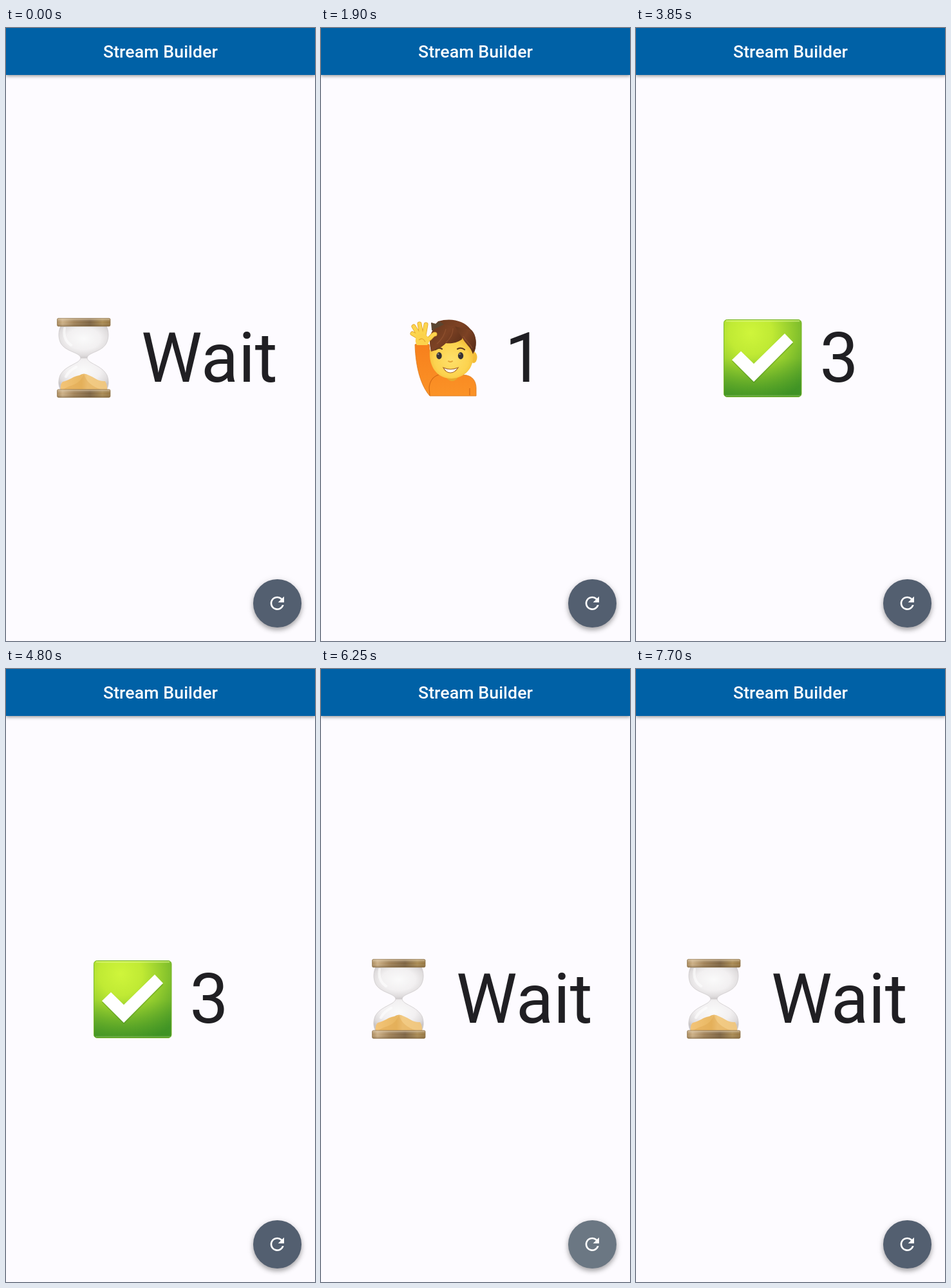
These frames come from a looping animation (480 by 953 pixels, 8000 ms). An HTML page:

```html
<!DOCTYPE html>
<html lang="en">
<head>
<meta charset="utf-8">
<title>Stream Builder</title>
<style>
  html, body { margin: 0; width: 100%; height: 100%; overflow: hidden; background: #fdfbff; }
  body { position: relative; font-family: Roboto, sans-serif; }
  header { position: absolute; left: 0; top: 0; width: 480px; height: 73px; background: #0061a6;
    box-shadow: 0 2px 5px rgba(0, 0, 0, .38); }
  .fab { position: absolute; left: 384px; top: 857px; width: 74.7px; height: 74.7px; border-radius: 50%;
    background: #535f70; box-shadow: 0 4px 7px rgba(0, 0, 0, .28), 0 2px 12px rgba(0, 0, 0, .12);
    animation: press 8s step-end infinite; }
  svg { position: absolute; left: 0; top: 0; width: 480px; height: 953px; }
  .title { font-size: 26.67px; font-weight: 500; letter-spacing: .1px; fill: #fff; text-anchor: middle; }
  .big { font-size: 106.67px; fill: #201f23; }
  .state { visibility: hidden; animation: 8s step-end infinite; }
  .wait { animation-name: wait; }
  .one { animation-name: one; }
  .two { animation-name: two; }
  .data { animation-name: data; }
  .done { animation-name: done; }
  @keyframes wait { 0%, 66.25% { visibility: visible } 23.75% { visibility: hidden } 100% { visibility: visible } }
  @keyframes data { 0%, 48.125%, 100% { visibility: hidden } 23.75% { visibility: visible } }
  @keyframes one { 0%, 36.25%, 100% { visibility: hidden } 23.75% { visibility: visible } }
  @keyframes two { 0%, 48.125%, 100% { visibility: hidden } 36.25% { visibility: visible } }
  @keyframes done { 0%, 66.25%, 100% { visibility: hidden } 48.125% { visibility: visible } }
  @keyframes press {
    0%, 84.375%, 100% { background: #535f70 }
    71.875% { background: #65717f }
    78.125% { background: #6b7783 }
  }
</style>
</head>
<body>
<header></header>
<div class="fab"></div>
<svg viewBox="0 0 480 953">
  <defs>
    <linearGradient id="wood">
      <stop offset="0" stop-color="#a98a5c"/><stop offset=".1" stop-color="#cdb085"/>
      <stop offset=".32" stop-color="#a08156"/><stop offset=".62" stop-color="#7c6240"/>
      <stop offset=".85" stop-color="#a98a52"/><stop offset="1" stop-color="#94743f"/>
    </linearGradient>
    <linearGradient id="gloss" x2="0" y2="1">
      <stop offset="0" stop-color="#fff" stop-opacity=".3"/><stop offset=".5" stop-color="#fff" stop-opacity="0"/>
      <stop offset="1" stop-color="#3e2a0c" stop-opacity=".3"/>
    </linearGradient>
    <radialGradient id="glass" cx=".5" cy=".4" r=".62">
      <stop offset="0" stop-color="#fafafa"/><stop offset=".55" stop-color="#f2f0f1"/>
      <stop offset=".85" stop-color="#dedbdc"/><stop offset="1" stop-color="#c9c5c6"/>
    </radialGradient>
    <linearGradient id="sand">
      <stop offset="0" stop-color="#f3c478"/><stop offset=".45" stop-color="#e9b863"/>
      <stop offset=".58" stop-color="#f2cb84"/><stop offset="1" stop-color="#efc680"/>
    </linearGradient>
    <radialGradient id="green" gradientUnits="userSpaceOnUse" cx="178" cy="474" r="112">
      <stop offset="0" stop-color="#cff53b"/><stop offset=".3" stop-color="#c0ea34"/>
      <stop offset=".62" stop-color="#8cc72d"/><stop offset="1" stop-color="#4b9b27"/>
    </radialGradient>
    <linearGradient id="shade" x2="0" y2="1">
      <stop offset=".5" stop-color="#328a22" stop-opacity="0"/><stop offset="1" stop-color="#328a22" stop-opacity=".55"/>
    </linearGradient>
    <linearGradient id="shirt" x2="0" y2="1">
      <stop offset="0" stop-color="#f77f1c"/><stop offset="1" stop-color="#fb9327"/>
    </linearGradient>
    <radialGradient id="skin" cx=".5" cy=".55" r=".6">
      <stop offset="0" stop-color="#fee06a"/><stop offset=".65" stop-color="#fcd34f"/>
      <stop offset="1" stop-color="#efb42f"/>
    </radialGradient>
    <linearGradient id="hair" x2="1" y2=".7">
      <stop offset="0" stop-color="#67381d"/><stop offset=".5" stop-color="#7d4224"/><stop offset="1" stop-color="#5c2f19"/>
    </linearGradient>
  </defs>

  <text class="title" x="240" y="46">Stream Builder</text>
  <path transform="translate(405.3 878.3) scale(1.333)" fill="#fff" d="M17.65 6.35C16.2 4.9 14.21 4 12 4c-4.42 0-7.99 3.58-7.99 8s3.57 8 7.99 8c3.73 0 6.84-2.55 7.73-6h-2.08c-.82 2.33-3.04 4-5.65 4-3.31 0-6-2.69-6-6s2.69-6 6-6c1.66 0 3.14.69 4.22 1.78L13 11h7V4l-2.35 2.35z"/>

  <g class="state wait">
    <g stroke="#cfcbcc" stroke-width=".8" fill="url(#glass)">
      <path d="M85 463C81 472 81 482 85 490C93 504 115 504 116 513H126C127 504 149 504 156 490C160 482 160 472 156 463Z"/>
      <path d="M116 513C115 522 92 524 84 540C81 548 81 556 85 563H156C160 556 160 548 157 540C149 524 127 522 126 513Z"/>
    </g>
    <path d="M91 467C89 478 92 487 101 493M93 542C97 534 103 530 109 527" fill="none" stroke="#fff" stroke-width="4" stroke-linecap="round" opacity=".6"/>
    <path fill="url(#sand)" d="M85 563C84 558 85 553 88 550C98 548 105 541 114 540Q121 535 129 540C137 543 143 550 154 549Q158 556 157 563Z"/>
    <path fill="#dca24b" opacity=".4" d="M88 563C99 553 113 558 121 538Q126 556 151 563Z"/>
    <g id="caps">
      <g id="cap">
        <rect x="79.5" y="451.3" width="82.5" height="12.4" rx="2" fill="url(#wood)"/>
        <rect x="79.5" y="451.3" width="82.5" height="12.4" rx="2" fill="url(#gloss)" stroke="#8f7249" stroke-width=".7"/>
        <path d="M81 453H161" stroke="#d8c19a" opacity=".75"/>
      </g>
      <use href="#cap" y="110.6"/>
    </g>
    <text class="big" x="210" y="550">Wait</text>
  </g>

  <g class="state data">
    <path fill="url(#hair)" d="M171 502C168 489 168 478 174 469L171 458L178 460L182 456C202 450 222 455 232 468C240 474 242 485 240 498L237 508H224L217 486L196 487L178 502Z"/>
    <path fill="#5b4631" d="M172 470L171 458L178 460L184 456L191 461L187 471Z"/>
    <path fill="url(#shirt)" stroke="#d9781e" stroke-width=".8" d="M146 492Q157 488 168 492C170 513 174 528 183 538L195 542C200 549 207 548 212 541C229 536 241 544 241 560V572H169C156 557 147 530 146 492Z"/>
    <path fill="none" stroke="#d56b15" stroke-width="1.2" d="M183 539C174 542 169 549 168 559L169 571M231 560V571"/>
    <path fill="#e8a92d" d="M194 535H213V543Q204 555 194 543Z"/>
    <ellipse cx="237" cy="512" rx="5.5" ry="9" fill="#f3bd38"/>
    <path fill="url(#skin)" d="M169 501C177 501 186 497 194 488C207 490 218 484 222 480C226 491 233 497 236 500C240 526 226 544 203 545C180 545 167 526 169 501Z"/>
    <path fill="url(#hair)" d="M171 503C168 489 169 477 176 468L191 461L207 464C217 467 221 475 219 484C211 490 201 491 194 490C188 496 180 501 171 503Z"/>
    <path fill="url(#hair)" d="M208 464L231 469C243 480 243 493 236 507C233 496 224 491 219 481Z"/>
    <path fill="none" stroke="#9b5a36" stroke-width="1.2" opacity=".6" d="M180 491C187 485 192 477 194 468M194 489C202 482 205 475 205 467M221 479C226 488 232 491 235 498"/>
    <path fill="none" stroke="#684021" stroke-width="2.2" stroke-linecap="round" d="M178 500Q183 496 188 499M212 499Q218 496 223 500"/>
    <g fill="#363235">
      <ellipse cx="183.5" cy="509.5" rx="4.2" ry="5.4"/><ellipse cx="217" cy="509.5" rx="4.2" ry="5.4"/>
    </g>
    <g fill="#8a8585"><circle cx="182" cy="507" r="1.3"/><circle cx="215.5" cy="507" r="1.3"/></g>
    <path fill="none" stroke="#e4a735" stroke-width="2" stroke-linecap="round" d="M198 518Q201 520 204 518"/>
    <path fill="#fff" stroke="#a7672a" stroke-width="1.2" d="M190 528Q201 533 213 528Q208 536 201 536Q194 536 190 528Z"/>
    <g fill="none" stroke-linecap="round">
      <path id="fingers" d="M154 482L142 475M153 479L144 464M156 477L153 460M160 478L163 461M164 485C171 484 172 476 177 476" stroke="#e2a32b" stroke-width="7"/>
      <path d="M154 482L142 475M153 479L144 464M156 477L153 460M160 478L163 461M164 485C171 484 172 476 177 476" stroke="#fcd54e" stroke-width="5.4"/>
    </g>
    <path fill="#fcd24c" d="M148 479Q157 471 165 479L169 484Q168 490 165 493H149Q145 488 148 479Z"/>
    <path fill="none" stroke="#e4a52e" stroke-width="1.1" d="M152 485Q158 480 162 488"/>
  </g>
  <text class="big state one" x="285.6" y="550">1</text>
  <text class="big state two" x="285.6" y="550">2</text>

  <g class="state done">
    <rect x="136.5" y="453.5" width="120.5" height="120" rx="5" fill="url(#green)"/>
    <rect x="136.5" y="453.5" width="120.5" height="120" rx="5" fill="url(#shade)" stroke="#78b52b"/>
    <path d="M140 455.5H254" stroke="#def78a" stroke-width="2" opacity=".65"/>
    <path d="M139 571.5H255" stroke="#86bd55" stroke-width="1.5" opacity=".7"/>
    <path fill="#3b7b18" opacity=".35" d="M149 518L163 505L183 523L231 477L244 491L183 552Z"/>
    <path fill="#fff" d="M149 516L163 502.5L183 522L231 475L244 488.5L183 550Z"/>
    <text class="big" x="285.6" y="550">3</text>
  </g>
</svg>
</body>
</html>
```
